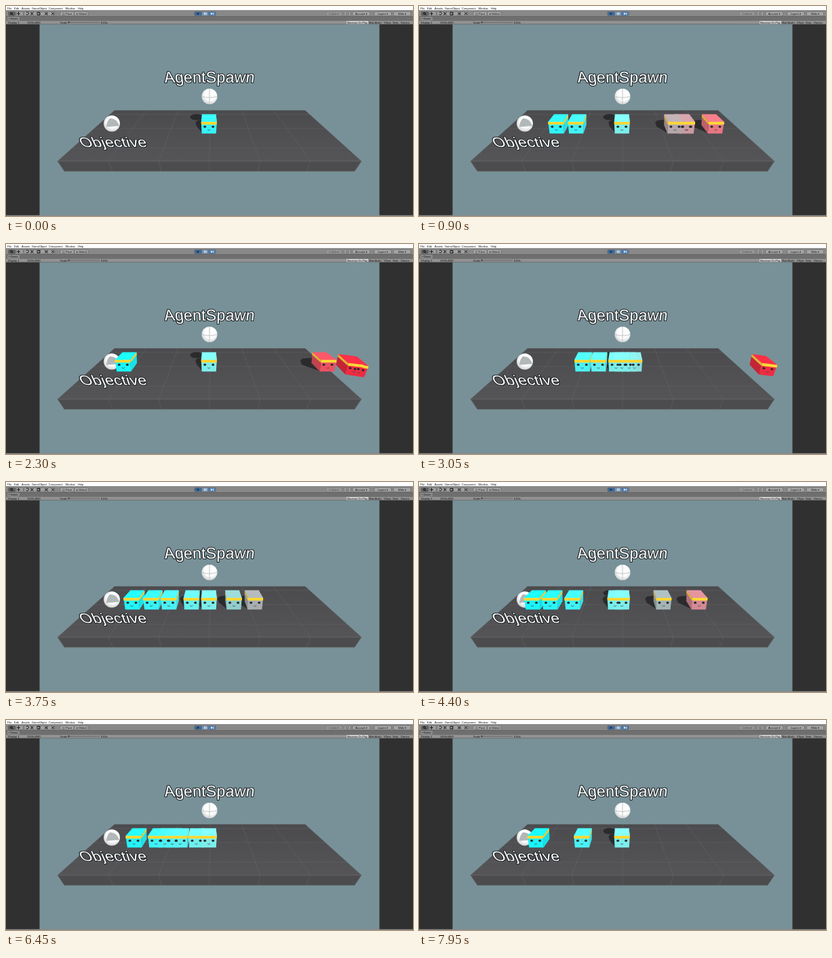
Recreate the animation shown at these times as an HTML page. Size 600x310 px, loop 8000 ms.

```html
<!DOCTYPE html>
<html lang="en">
<head>
<meta charset="utf-8">
<title>Agent training</title>
<style>
html, body { margin: 0; width: 100%; height: 100%; overflow: hidden; background: #313131; }
svg { display: block; width: 600px; height: 310px; }
text { font-family: "Liberation Sans", Arial, sans-serif; }
.ui text { font-size: 4px; fill: #111; }
.label text { font-size: 23.2px; fill: #fff; stroke: #1d2224; stroke-width: 2.2; stroke-linejoin: round; paint-order: stroke; }
</style>
</head>
<body>
<svg viewBox="0 0 600 310">
  <defs>
    <linearGradient id="floor" x1="0" y1="0" x2="0" y2="1">
      <stop offset="0" stop-color="#4b4b4e"/><stop offset="1" stop-color="#555558"/>
    </linearGradient>
    <radialGradient id="ball" cx=".55" cy=".4" r=".66">
      <stop offset=".55" stop-color="#fdfdfd"/><stop offset="1" stop-color="#c4c8c9"/>
    </radialGradient>
    <clipPath id="view"><path d="M49.5 27H550.5V309H49.5Z"/></clipPath>
  </defs>
  <rect width="600" height="310" fill="#303030"/>
  <g clip-path="url(#view)">
    <path d="M49 27H551V309H49Z" fill="#789198"/>
    <path d="M160 154H441L524 229H76Z" fill="url(#floor)"/>
    <path d="M76 229H524L514 244H86Z" fill="#4c4c4e"/>
    <g id="grid" fill="none" stroke="#69696b" stroke-width=".7"></g>
    <path d="M76 229H524L514 244H86Z" fill="none" stroke="#656568" stroke-width=".7"/>
    <ellipse cx="281" cy="164" rx="9.5" ry="4.6" fill="#2b2b2d"/>
    <circle cx="156" cy="173.5" r="12" fill="url(#ball)"/>
    <path d="M153 166Q163 165 167 177L148 178.5Q148.500 170 153 166Z" fill="#b2b7b8"/>
    <g id="agents"></g>
    <circle cx="300" cy="133.5" r="11.5" fill="url(#ball)"/>
    <path d="M288.800 133.500Q300 137 311.200 133.500M300 122V145" fill="none" stroke="#bcbfc0" stroke-width=".9"/>
    <g id="labels" class="label"></g>
  </g>
  <g id="ui" class="ui"></g>
</svg>
<script>
const $ = id => document.getElementById(id);
const poly = (pts, fill) =>
  `<path d="M${pts.map(p => p.map(n => n.toFixed(2)).join(' ')).join('L')}Z" fill="${fill}"/>`;
const rect = (x, y, w, h, fill, extra = '') =>
  `<rect x="${x}" y="${y}" width="${w}" height="${h}" fill="${fill}" ${extra}/>`;
const text = (x, y, s, extra = '') => `<text x="${x}" y="${y}" ${extra}>${s}</text>`;

// Floor grid converging on the horizon
const HORIZON = 28;
function drawGrid() {
  let d = '';
  for (let i = 0; i <= 6; i++) {
    const near = 76 + i * 448 / 6;
    d += `M${160 + i * 281 / 6} 154L${near} 229L${300 + (near - 300) * .955} 244`;
  }
  for (const y of [154, 160, 181, 210, 229]) {
    const half = (y - HORIZON) * 1.114;
    d += `M${300 - half} ${y}H${300 + half}`;
  }
  $('grid').innerHTML = `<path d="${d}" opacity=".65"/>`;
}

// Each letter leans away from the centre of the view
function label(str, x, y, squash, lean) {
  const ctx = document.createElement('canvas').getContext('2d');
  ctx.font = '23.2px "Liberation Sans", Arial, sans-serif';
  return [...str].map((ch, i) => {
    const px = x + ctx.measureText(str.slice(0, i)).width;
    const skew = (300 - px) / lean;
    return `<text transform="matrix(1 0 ${skew.toFixed(3)} ${squash} ${px.toFixed(2)} ${y})">${ch}</text>`;
  }).join('');
}

function drawUi() {
  let s = rect(0, 0, 600, 6.5, '#fdfdfd') + rect(0, 6.5, 600, 9, '#888') +
    rect(0, 15.5, 600, 6, '#6f6f6f') + rect(0, 21.5, 600, 5.5, '#929292') +
    rect(0, 26.6, 600, .6, '#555') + rect(0, 308.8, 600, 1.2, '#8a8a8a');
  const menu = { File: 2, Edit: 12, Assets: 23, GameObject: 38, Component: 63, Window: 87.5, Help: 106 };
  for (const name in menu) s += text(menu[name], 4.6, name);

  const button = (x, w, name = '', fill = '#a6a6a6') =>
    rect(x, 8.4, w, 5.8, fill, 'rx="1" stroke="#5c5c5c" stroke-width=".5"') +
    text(x + w / 2, 12.8, name, 'text-anchor="middle"');
  for (let i = 0; i < 6; i++) s += button(3.5 + i * 11.6, 10.2, '', i ? '#a0a0a0' : '#606060');
  s += `<g fill="none" stroke="#161616" stroke-width="1">
    <circle cx="8" cy="11" r="1.4"/><path d="M9 12L10.5 13.4M16 11.3H21M18.500 8.900V13.700M36.500 9.400L40.500 13.200M40.500 9.400L36.500 13.200
    M46 9.400H50V13.200H46ZM57 9.500L61 13.200M61 9.500L57 13.200M67 9.500L71 13.200M67 13.200L71 9.500"/><path d="M30 9.600A2 2 0 1 1 29.700 12"/></g>`;
  s += button(80, 20, '◫ Pivot') + button(101, 20, '● Global');
  s += button(278, 10.4, '', '#416b98') + button(288.4, 10.4, '', '#7594b5') + button(298.8, 10.4, '', '#4d7eb2');
  s += `<path d="M281.500 9.400L285.500 11.300L281.500 13.200Z" fill="#17365c"/>
    <path d="M292 9.400H293.200V13.200H292ZM294.200 9.400H295.400V13.200H294.200ZM302 9.400L305 11.300L302 13.200ZM305.400 9.400H306.300V13.200H305.400Z" fill="#e5eef8"/>`;
  s += `<g opacity=".5">${button(472, 23, 'Collab ▾')}</g>` + button(498.5, 9.5);
  s += '<ellipse cx="503.2" cy="11.5" rx="2.3" ry="1.3" fill="none" stroke="#333" stroke-width=".6"/>';
  s += button(511, 25.5, 'Account ▾') + button(543, 25, 'Layers ▾') + button(571.5, 25, 'Wide ▾');

  s += rect(2, 16, 18, 5.5, '#8a8a8a') + text(4, 20.3, '• Game');
  const row = { 'Display 1': 3, '1920x1080': 31, Scale: 80, '0.83x': 140 };
  for (const name in row) s += text(row[name], 25.7, name);
  s += rect(92, 23.8, 46, .6, '#444') + '<circle cx="92.5" cy="24.1" r="1.3" fill="#444"/>';
  s += rect(502, 22, 32, 4.4, '#d0d0d0');
  const right = { 'Maximize On Play': 503, 'Mute Audio': 535, VSync: 557, Stats: 570, Gizmos: 582 };
  for (const name in right) s += text(right[name], 25.6, name, 'style="font-size:3.7px"');
  $('ui').innerHTML = s;
}

// Runs: start ms, speed px/s, slowdown px/s², end ms
const RUNS = [
  [0, -105], [0, -74], [900, -88], [2300, -76.5], [2560, -70], [2920, -70], [3380, -70],
  [4250, -70], [5150, -83], [5360, -70], [5540, -70], [5690, -70], [5850, -70], [6180, -70], [7120, -70],
  [50, 306, 0, 880], [0, 148], [0, 89.7, 7.04, 3430], [0, 108.3, 7.94], [0, 108.1, 6.55],
  [2800, 68.5, 0, 5970], [2790, 36.4, 0, 5970]
];
const TINTS = [
  [176, 25, 245, 250], [237, 70, 241, 244], [300, 125, 238, 234], [335, 145, 205, 205],
  [365, 168, 173, 175], [386, 196, 158, 164], [433, 230, 118, 130], [461, 236, 90, 104], [510, 238, 42, 64]
];

function tint(x) {
  let i = 1;
  while (i < TINTS.length - 1 && x > TINTS[i][0]) i++;
  const a = TINTS[i - 1], b = TINTS[i];
  const k = Math.max(0, Math.min(1, (x - a[0]) / (b[0] - a[0])));
  return a.slice(1).map((c, j) => c + (b[j + 1] - c) * k);
}
const rgb = (c, k = 1) => `rgb(${c.map(v => Math.min(255, Math.round(v * k)))})`;

function cube(pos, fresh) {
  const x = 300 + (pos - 300) * 1.04, off = x - 300;
  const colour = tint(fresh ? 215 : pos);
  const low = 300 + off * .985, back = 300 + off * .92, lowBack = 300 + off * .985 * .925;
  const side = off < 0 ? 1 : -1;
  const top = 171, bottom = 188.3, rear = 159.7;
  const edge = h => [
    [x + side * (11.4 - .8 * h) + (low - x) * h, top + 17.3 * h],
    [back + side * (10.4 - .6 * h) + (lowBack - back) * h, rear + 16 * h]];
  const [a, b] = edge(0), [c, d] = edge(1), [e, f] = edge(.23);
  const fall = Math.max(0, pos - 480);
  const pose = fall ? ` transform="translate(0 ${(fall * .22).toFixed(2)}) rotate(${(fall * .25).toFixed(2)} ${x.toFixed(2)} 175)"` : '';
  const reach = low - 20 - off * .11;
  const shadow = pos > 480 ? '' : poly([[low - 9, bottom], [reach + 2, 178], [reach, 172], [reach + 3, 169], [low - 8, 167]], '#2b2b2d');
  const body = poly([a, b, d, c], rgb(colour, off < 0 ? .92 : .82)) +
    poly([a, b, f, e], off < 0 ? '#f3cf3c' : '#dfb234') +
    poly([[back - 10.4, rear], [back + 10.4, rear], [x + 11.4, top], [x - 11.4, top]], rgb(colour, 1.08)) +
    poly([[x - 11.4, top], [x + 11.4, top], [low + 10.6, bottom], [low - 10.6, bottom]], rgb(colour)) +
    poly([[x - 11.5, top], [x + 11.5, top], [x + 11.3, top + 4], [x - 11.3, top + 4]], '#fbd736');
  const m = (x + low) / 2;
  const face = `<g fill="#20292f"><ellipse cx="${m - 6}" cy="178.2" rx="1.9" ry="1.6"/><ellipse cx="${m + 6}" cy="178.2" rx="1.9" ry="1.6"/></g>
    <path d="M${m - 2} 182.6Q${m} 184.4 ${m + 2} 182.6" fill="none" stroke="#39474c" stroke-width=".8"/>`;
  return { dist: Math.abs(off), shadow, body: `<g${pose}>${body}</g>`, face: `<g${pose}>${face}</g>` };
}

function draw(t) {
  const cubes = [cube(299.2, t < 150)];
  for (const [start, speed, slow = 0, end = 1e9] of RUNS) {
    if (t <= start || t >= end) continue;
    const s = (t - start) / 1000;
    const pos = 300 + speed * s - slow * s * s;
    if (pos > 170 && pos < 552) cubes.push(cube(pos));
  }
  cubes.sort((a, b) => b.dist - a.dist);
  $('agents').innerHTML = ['shadow', 'body', 'face'].map(part => cubes.map(c => c[part]).join('')).join('');
}

const LOOP = 8000, STEP = 50;
let last = -1, origin = null;
function tick(now) {
  if (origin === null) origin = now;
  const t = Math.floor(((now - origin) % LOOP) / STEP) * STEP;
  if (t !== last) draw(last = t);
  requestAnimationFrame(tick);
}

drawGrid();
drawUi();
$('labels').innerHTML = label('AgentSpawn', 234.2, 112.8, 1, 420) + label('Objective', 112.3, 207.8, .87, 420);
draw(0);
requestAnimationFrame(tick);
</script>
</body>
</html>
```
